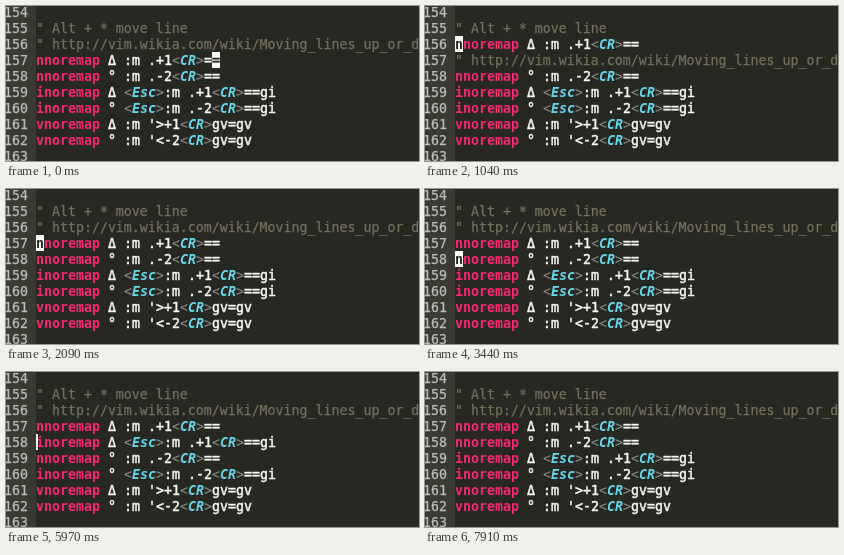
These frames come from a looping animation (413x155 px, 8 s). An HTML page with a canvas:

```html
<!DOCTYPE html>
<html lang="en">
<head>
<meta charset="utf-8">
<title>Moving lines in an editor</title>
<style>
  html, body { margin: 0; width: 100%; height: 100%; overflow: hidden; background: #272822; }
  canvas { display: block; }
</style>
</head>
<body>
<canvas id="stage" width="413" height="155"></canvas>
<script>
const ctx = document.getElementById('stage').getContext('2d', { alpha: false });
const LOOP = 8000;
const CELL = 8, ROW = 16, LEFT = 30, TOP = 14, BASELINE = 13;
const FIRST_NUMBER = 155;
const FAMILY = '13.288px "DejaVu Sans Mono", "Noto Sans Mono", monospace';

// weight is an outline in px that thickens the regular face
const STYLES = {
  number: { color: '#bcbcbc', font: FAMILY, weight: 0.25 },
  comment: { color: '#75715e', font: FAMILY, weight: 0.25 },
  keyword: { color: '#f92672', font: 'bold ' + FAMILY, weight: 0 },
  text: { color: '#f8f8f2', font: FAMILY, weight: 0.5 },
  bracket: { color: '#8f8f8f', font: FAMILY, weight: 0 },
  special: { color: '#66d9ef', font: 'italic bold ' + FAMILY, weight: 0 }
};
const BACK = '#272822', GUTTER = '#3b3a32', CURSOR = '#f8f8f2';

const LINES = [
  '" Alt + * move line',
  '" http://vim.wikia.com/wiki/Moving_lines_up_or_down',
  'nnoremap Δ :m .+1<CR>==',
  'nnoremap ° :m .-2<CR>==',
  'inoremap Δ <Esc>:m .+1<CR>==gi',
  'inoremap ° <Esc>:m .-2<CR>==gi',
  "vnoremap Δ :m '>+1<CR>gv=gv",
  "vnoremap ° :m '<-2<CR>gv=gv"
];

// start time, order of the first five lines, cursor shape, cursor row, cursor column
const STEPS = [
  [0, '01234', 'block', 2, 22],
  [300, '02134', 'block', 1],
  [600, '20134', 'block', 0],
  [1040, '02134', 'block', 1],
  [1190, '01234', 'block', 2],
  [1340, '01324', 'block', 3],
  [2090, '01234', 'block', 2],
  [2690, '01234', 'block', 3],
  [3140, '01324', 'block', 2],
  [3440, '01234', 'block', 3],
  [4190, '01234', 'hidden'],
  [4330, '01234', 'block', 3],
  [4480, '01234', 'block', 4],
  [4920, '01234', 'bar', 4],
  [5520, '01234', 'hidden'],
  [5820, '01234', 'bar', 4],
  [5970, '01243', 'bar', 3],
  [6570, '01234', 'bar', 4],
  [7320, '01234', 'hidden'],
  [7610, '01234', 'bar', 4],
  [7910, '01234', 'hidden']
];

function put(text, col, row, style, color = style.color) {
  const x = LEFT + col * CELL, y = TOP + row * ROW + BASELINE;
  ctx.font = style.font;
  ctx.fillStyle = ctx.strokeStyle = color;
  ctx.fillText(text, x, y);
  if (style.weight) {
    ctx.lineWidth = style.weight;
    ctx.strokeText(text, x, y);
  }
}

function drawLine(line, row) {
  if (line[0] === '"') {
    put(line, 0, row, STYLES.comment);
    return;
  }
  let col = 0;
  for (const part of line.split(/(^\w+|<\w+>)/)) {
    if (/^<\w+>$/.test(part)) {
      put('<', col, row, STYLES.bracket);
      put(part.slice(1, -1), col + 1, row, STYLES.special);
      put('>', col + part.length - 1, row, STYLES.bracket);
    } else {
      put(part, col, row, col ? STYLES.text : STYLES.keyword);
    }
    col += part.length;
  }
}

function drawCursor(shape, row, col, line) {
  if (shape === 'hidden') return;
  ctx.fillStyle = CURSOR;
  ctx.fillRect(LEFT + col * CELL, TOP + row * ROW, shape === 'bar' ? 2 : CELL, ROW);
  if (shape === 'block') put(line[col], col, row, col ? STYLES.text : STYLES.keyword, BACK);
}

function draw(time) {
  const [, order, shape, cursorRow, cursorCol = 0] = STEPS.findLast(step => step[0] <= time);
  const lines = [...order].map(i => LINES[i]).concat(LINES.slice(order.length));

  ctx.fillStyle = BACK;
  ctx.fillRect(0, 0, 413, 155);
  ctx.fillStyle = GUTTER;
  ctx.fillRect(0, 0, LEFT, 155);
  ctx.lineJoin = 'round';
  for (let row = -1; row <= lines.length; row++) {
    put(String(FIRST_NUMBER + row), -4, row, STYLES.number);
  }
  lines.forEach(drawLine);
  drawCursor(shape, cursorRow, cursorCol, lines[cursorRow]);
}

const start = performance.now();
function tick() {
  draw((performance.now() - start) % LOOP);
  requestAnimationFrame(tick);
}
tick();
</script>
</body>
</html>
```
